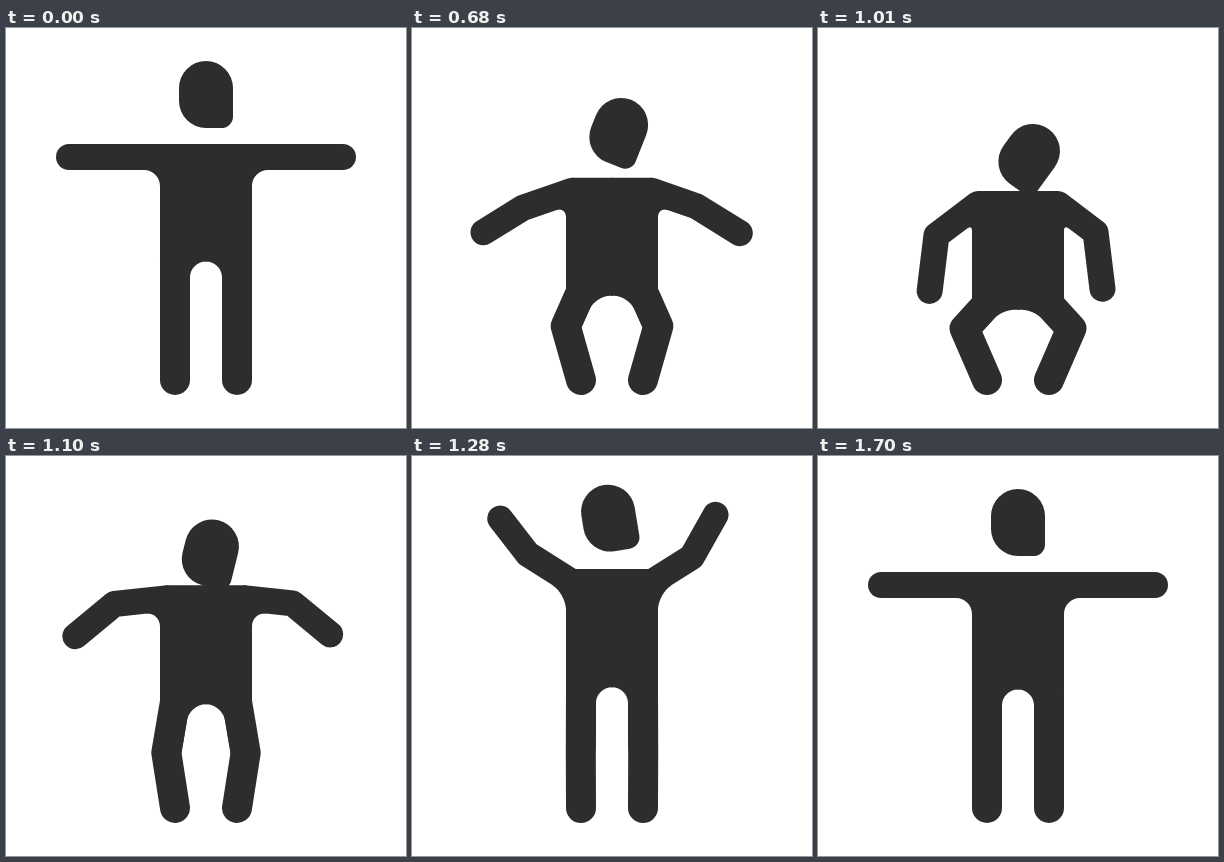
Animation, 400 px wide and 400 px high, one loop 1.76 s. Source, as an HTML page:

```html
<!DOCTYPE html>
<html lang="en">
<head>
<meta charset="utf-8">
<title>Squat and stretch</title>
<style>
  html, body { margin: 0; width: 100%; height: 100%; overflow: hidden; background: #fff; }
  svg { display: block; width: 100vw; height: 100vh; }
  .fill { fill: #2d2d2d; }
  .limb { fill: none; stroke: #2d2d2d; stroke-linecap: round; stroke-linejoin: round; }
  .arm { stroke-width: 26; }
  .leg { stroke-width: 30; }
</style>
</head>
<body>
<svg viewBox="0 0 400 400">
  <path id="head" class="fill" d="M-27 -6.5A27 27 0 0 1 27 -6.5V22A11.5 11.5 0 0 1 15.5 33.5H0A27 27 0 0 1 -27 6.5Z"/>
  <g class="half"></g>
  <g class="half" transform="translate(400) scale(-1 1)"></g>
</svg>
<script>
const LOOP = 1760, START = 530, STEP = 30, LAST = 1700;
const SIDE = 154, HIP_X = 169, FOOT_Y = 352, JOINT_X = 160, ARM_R = 13, LEG_R = 15, SHIN = 56;
const REST_TOP = 116, REST_HIP = 232.5;

// Rest, squat, push off, stand, stretch, rest
const beats = [518, 830, 1010, 1160, 1340, LAST];
// Angles in degrees; arm angles count downwards from the horizontal
const tracks = {
  top: [REST_TOP, 180, 163, 114, 113, REST_TOP],
  headY: [66.5, 135.5, 128.3, 76.5, 59.8, 66.5],
  turn: [0, 41, 36, 0, -10.8, 0],
  knee: [0, 30, 23.5, 1.7, 0, 0],
  upper: [0, 36.5, 37, -16, -35, 0],
  fore: [0, 69, 83, 1, -68, 0]
};
// Arm lengths per side; lift scales how far the forearm goes up
const sides = [
  { upper: 52, fore: [45, 49, 56, 47, 45, 45], lift: 0.93 },
  { upper: 47, fore: [50, 53, 57, 44, 50, 50], lift: 1.08 }
];

// Monotone cubic: flat at turning points, smooth elsewhere
const rate = (v, i) => (v[i + 1] - v[i]) / (beats[i + 1] - beats[i]);
function slope(v, i) {
  if (i === 0 || i === v.length - 1) return 0;
  const a = rate(v, i - 1), b = rate(v, i);
  return a * b > 0 ? 2 * a * b / (a + b) : 0;
}
function ease(v, t) {
  let i = 0;
  while (i < beats.length - 2 && t >= beats[i + 1]) i++;
  const span = beats[i + 1] - beats[i], u = (t - beats[i]) / span;
  return v[i] + (v[i + 1] - v[i]) * u * u * (3 - 2 * u)
    + span * u * (1 - u) * ((1 - u) * slope(v, i) - u * slope(v, i + 1));
}

const rad = deg => deg * Math.PI / 180;
const xy = (x, y) => x.toFixed(2) + ' ' + y.toFixed(2);
// Rounded corner from a to b around q
function bend(a, q, b, k = 0.552) {
  const c = p => xy(p[0] + (q[0] - p[0]) * k, p[1] + (q[1] - p[1]) * k);
  return `L${xy(...a)}C${c(a)} ${c(b)} ${xy(...b)}`;
}

function armShape(pose, side, t) {
  const a = rad(pose.upper), b = rad(pose.fore < 0 ? pose.fore * side.lift : pose.fore);
  const y = pose.top + ARM_R, dx = -Math.cos(a), dy = Math.sin(a), fore = ease(side.fore, t);
  const ex = JOINT_X + dx * side.upper, ey = y + dy * side.upper;
  const hx = ex - Math.cos(b) * fore, hy = ey + Math.sin(b) * fore;

  const s = (JOINT_X + ARM_R * dy - SIDE) / -dx;
  const pit = [SIDE, y - ARM_R * dx + s * dy];
  const r = 16 - 16 * Math.max(a, 0);
  const from = [pit[0] + dx * r, pit[1] + dy * r], to = [SIDE, pit[1] + r];
  return {
    line: `M${xy(JOINT_X, y)}L${xy(ex, ey)}L${xy(hx, hy)}`,
    pit: `M${xy(JOINT_X, y)}${bend(from, pit, to)}Z`
  };
}

function bodyShape({ top, knee }) {
  const hip = REST_HIP + 0.8 * (top - REST_TOP) + 0.26 * knee;
  const kx = HIP_X - SHIN * Math.sin(rad(knee)), ky = FOOT_Y - SHIN * Math.cos(rad(knee));
  const len = Math.hypot(HIP_X - kx, hip - ky);
  const dx = (HIP_X - kx) / len, dy = (hip - ky) / len;

  // Inner thigh meets the crotch line at q
  const crotch = hip + 1 + 0.2 * (HIP_X - kx);
  const px = kx - LEG_R * dy, py = ky + LEG_R * dx;
  const q = [px + (crotch - py) * dx / dy, crotch];
  const r = (200 - q[0]) * -dy;
  const arch = bend([q[0] + r, crotch], q, [q[0] - dx * r, q[1] - dy * r]);
  return {
    torso: `M${xy(JOINT_X, top)}H201V${crotch.toFixed(2)}${arch}L${xy(px, py)}`
      + `L${xy(HIP_X, hip)}H${SIDE}V${(top + ARM_R).toFixed(2)}Z`,
    leg: `M${xy(HIP_X, hip)}L${xy(kx, ky)}L${xy(HIP_X, FOOT_Y)}`
  };
}

const head = document.getElementById('head');
const halves = [...document.querySelectorAll('.half')].map(g =>
  ['fill', 'fill', 'limb arm', 'limb leg'].map(name => {
    const path = document.createElementNS('http://www.w3.org/2000/svg', 'path');
    path.setAttribute('class', name);
    return g.appendChild(path);
  }));

function draw(t) {
  const pose = {};
  for (const name in tracks) pose[name] = ease(tracks[name], t);

  // The head slides sideways as it tilts
  const headX = 200 + 0.31 * pose.turn;
  head.setAttribute('transform', `translate(${xy(headX, pose.headY)}) rotate(${pose.turn.toFixed(2)})`);

  const body = bodyShape(pose);
  halves.forEach((paths, i) => {
    const limb = armShape(pose, sides[i], t);
    [body.torso, limb.pit, limb.line, body.leg].forEach((d, n) => paths[n].setAttribute('d', d));
  });
}

const begin = performance.now();
function tick() {
  const t = (performance.now() - begin) % LOOP;
  draw(t < START ? beats[0] : Math.min(LAST, START + Math.floor((t - START) / STEP) * STEP));
  requestAnimationFrame(tick);
}
tick();
</script>
</body>
</html>
```
